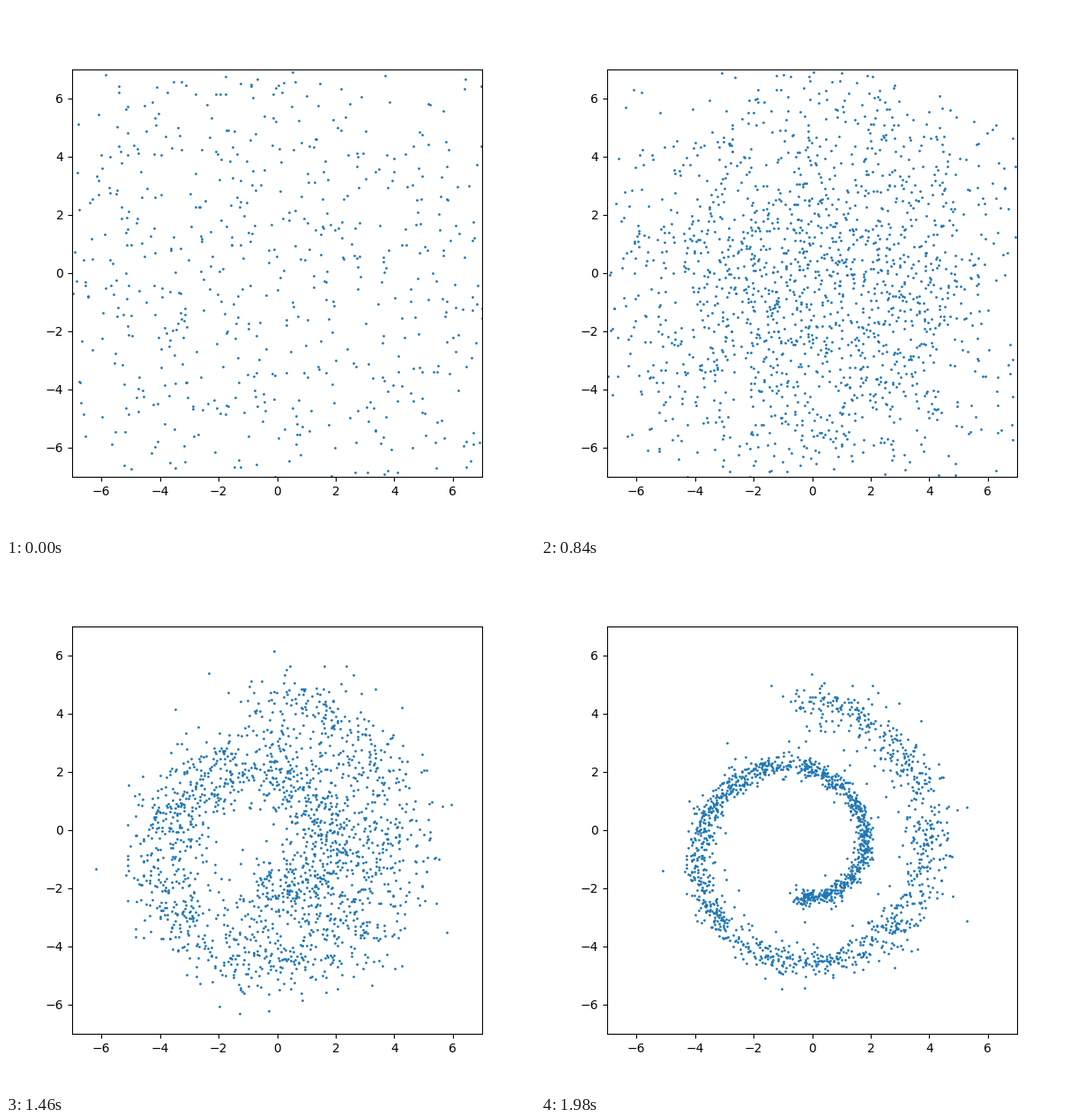
Write a matplotlib script that moves like this. It is 600 px wide and 600 px high and loops after 2000 ms.

```python
import numpy as np
import matplotlib.pyplot as plt
from matplotlib.animation import FuncAnimation

FRAMES, INTERVAL = 100, 20
POINTS, CENTRES = 1800, 150
SIGMA_MAX, SIGMA_MIN, RHO = 8.2, 0.1, 3

rng = np.random.default_rng(7)


def swiss_roll():
    """Centres and widths of a Gaussian mixture along a spiral."""
    u = (np.arange(CENTRES) + 0.5) / CENTRES
    t = 1.5 * np.pi * (1 + 2 * u)
    centres = 0.36 * t[:, None] * np.column_stack([np.cos(t), np.sin(t)])
    centres += [-0.49, -0.6]
    widths = 0.07 + 0.36 * u**1.5
    widths[::10] *= 2.5  # a few stragglers
    return centres, widths


def noise_levels():
    """Noise schedule, evenly spaced in the RHO-th root of sigma."""
    roots = np.linspace(SIGMA_MAX ** (1 / RHO), SIGMA_MIN ** (1 / RHO), FRAMES)
    return roots**RHO


def score(x, centres, var):
    """Gradient of the log density of the mixture at each point."""
    d2 = ((x[:, None, :] - centres) ** 2).sum(axis=2)
    logp = -d2 / (2 * var) - np.log(var)
    w = np.exp(logp - logp.max(axis=1, keepdims=True))
    w /= w.sum(axis=1, keepdims=True)
    w /= var
    return w @ centres - x * w.sum(axis=1, keepdims=True)


def denoise():
    """Follow the probability flow from wide noise down to the spiral."""
    centres, widths = swiss_roll()
    sigmas = noise_levels()
    pick = rng.integers(CENTRES, size=POINTS)
    spread = np.hypot(widths[pick], SIGMA_MAX)[:, None]
    x = centres[pick] + spread * rng.standard_normal((POINTS, 2))
    path = [x]
    for now, after in zip(sigmas, sigmas[1:]):
        x = x + now * (now - after) * score(x, centres, widths**2 + now**2)
        path.append(x)
    return path


path = denoise()

fig, ax = plt.subplots(figsize=(6, 6), dpi=100)
ax.set_xlim(-7, 7)
ax.set_ylim(-7, 7)
dots, = ax.plot([], [], ".", color="#1f77b4", markersize=2)


def update(i):
    dots.set_data(path[i][:, 0], path[i][:, 1])
    return dots,


anim = FuncAnimation(fig, update, frames=FRAMES, interval=INTERVAL,
                     repeat=True, repeat_delay=0)
plt.show()
```
